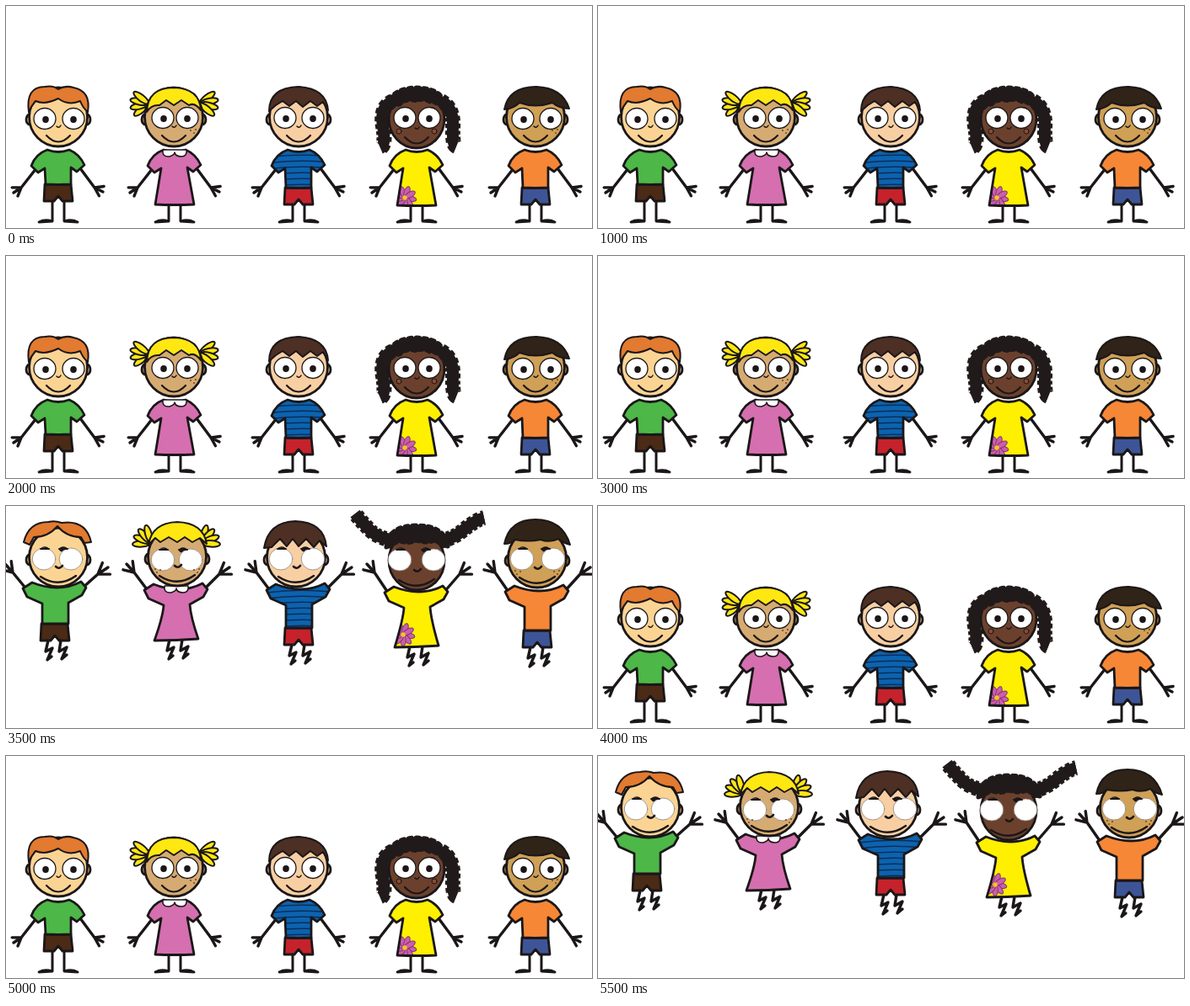
These frames come from a looping animation (695 px wide and 264 px high, 6000 ms). An HTML page:

```html
<!DOCTYPE html>
<html lang="en">
<head>
<meta charset="utf-8">
<title>Jumping children</title>
<style>
html, body { margin: 0; width: 100%; height: 100%; overflow: hidden; background: #fff; }
svg { display: block; width: 695px; height: 264px; }
</style>
</head>
<body>
<svg id="stage" viewBox="0 0 695 264" fill="none" stroke="#1b1718" stroke-width="2.8" stroke-linecap="round" stroke-linejoin="round"></svg>
<script>
const ink = '#1b1718', flat = 'stroke="none"';
const path = (d, fill = 'none', extra = '') => `<path d="${d}" fill="${fill}" ${extra}/>`;
const oval = (x, y, rx, ry, fill, extra = '') => `<ellipse cx="${x}" cy="${y}" rx="${rx}" ry="${ry}" fill="${fill}" ${extra}/>`;
const at = (x, y, s) => `<g transform="translate(${x} ${y})">${s}</g>`;

// x: body centre, head: [x, y], eyes: [left x, right x, y], hem: lower edge of the top
const kids = [
  {
    skin: '#fbd494', hair: '#e27a30', top: '#4db748', shorts: '#4b2a16',
    stand: { x: 62, head: [62, 132], eyes: [46, 80, 134], hem: 212,
      hair: 'M27 126Q23 96 46 96Q56 94 62 99Q70 94 80 97Q101 101 97 126Q91 121 88 113Q74 119 62 110Q46 118 35 113Q30 119 27 126Z' },
    jump: { x: 58, dy: 0, head: [62, 61], eyes: [45, 77, 63], hem: 140,
      hair: 'M21 43Q27 19 50 19Q58 17 66 20Q95 16 101 43L93 44L89 37Q72 37 61 24Q50 37 33 37L28 46Z' }
  },
  {
    skin: '#d6ab72', hair: '#ffe711', top: '#d56fb0', dress: true, tails: true, freckles: true,
    stand: { x: 200, head: [199, 132], eyes: [186, 215, 133], hem: 236, tail: [169, 230, 116, 140],
      hair: 'M167 126Q168 97 199 97Q230 98 231 124Q224 114 217 118L208 112L199 118L190 112L182 118Q172 117 167 126Z' },
    jump: { x: 202, dy: 2, head: [203, 60], eyes: [186, 219, 64], hem: 159, tail: [172, 232, 44, 176],
      hair: 'M169 46Q173 20 203 19Q234 20 238 45L230 38L221 43L212 37L203 43L193 37L183 43L177 38Z' }
  },
  {
    skin: '#f8cfa3', hair: '#4d2f24', top: '#0c63ae', shorts: '#c5222c', stripes: true,
    stand: { x: 347, head: [347, 132], eyes: [331, 364, 133], hem: 216,
      hair: 'M312 125Q312 97 347 96Q380 98 382 124L376 114L369 119L361 113L352 120L344 113L336 119L328 113L320 118Z' },
    jump: { x: 347, dy: 2, head: [344, 61], eyes: [326, 364, 63], hem: 145,
      hair: 'M306 50Q311 19 343 18Q377 19 380 48L372 41L365 49L356 39L347 48L340 39L333 48L325 39L315 49Z' }
  },
  {
    skin: '#6b412d', hair: '#211a1b', top: '#fff000', dress: true, braided: true,
    stand: { x: 487, head: [487, 134], eyes: [473, 502, 133], hem: 237, flower: [-14, 228],
      hair: 'M453 129Q449 98 487 97Q525 98 521 129Q516 114 503 114Q494 109 487 113Q475 109 467 117Q457 117 453 129Z',
      braids: ['M459 113Q443 120 447 143T444 169', 'M516 113Q531 121 530 143T534 167'] },
    jump: { x: 487, dy: 5, head: [487, 65], eyes: [467, 507, 64], hem: 167, flower: [-16, 153],
      hair: 'M451 49Q453 23 487 23Q521 23 524 48Q514 45 509 41Q498 45 487 41Q476 46 466 41Q458 47 451 49Z',
      braids: ['M466 41Q443 40 432 29T414 9', 'M508 42Q526 42 542 29T567 14'] }
  },
  {
    skin: '#cfa056', hair: '#302317', top: '#f68736', shorts: '#3d5597', freckles: true,
    stand: { x: 628, head: [628, 132], eyes: [613, 646, 134], hem: 216,
      hair: 'M591 123Q596 96 629 96Q660 97 668 122Q656 122 648 115Q628 122 609 115Q602 122 591 123Z' },
    jump: { x: 630, dy: 4, head: [630, 62], eyes: [612, 649, 63], hem: 148,
      hair: 'M591 45Q597 16 628 16Q660 16 669 46Q660 44 655 39Q645 44 634 40Q620 43 603 40Q600 45 591 45Z' }
  }
];

function arm(x0, y0, x1, y1, x2, y2) {
  const a = Math.atan2(y2 - y1, x2 - x1), len = Math.hypot(x2 - x1, y2 - y1);
  let d = `M${x0} ${y0}L${x1} ${y1}`;
  for (const turn of [-0.6, 0, 0.6])
    d += `M${x1} ${y1}l${len * Math.cos(a + turn)} ${len * Math.sin(a + turn)}`;
  return path(d, 'none', 'stroke-width="3.4"');
}

function petals(x, y, count, length, width, fill, from, step) {
  let s = '';
  for (let i = 0; i < count; i++)
    s += `<g transform="translate(${x} ${y}) rotate(${from + i * step})">${oval(length / 2, 0, length / 2, width, fill)}</g>`;
  return s;
}

function jumpTop(dy, hem, dress) {
  const Y = y => y + dy;
  const sides = dress
    ? [`Q17 ${Y(130)} 26 ${hem - 1}`, `Q0 ${hem + 1} -26 ${hem + 1}Q-16 ${Y(130)}`]
    : [`L16 ${hem}`, `L-15 ${hem}L`];
  return `M-27 ${Y(91)}Q-12 ${Y(97)} 2 ${Y(97)}Q18 ${Y(97)} 31 ${Y(90)}L37 ${Y(97)}L32 ${Y(106)}L16 ${Y(115)}`
    + `${sides[0]}${sides[1]} -15 ${Y(116)}L-33 ${Y(108)}L-38 ${Y(98)}Z`;
}

function standTop(hem, dress) {
  const w = dress ? 23 : 15;
  return `M-13 171Q0 176 13 171Q25 176 31 189L22 197L15 192L${w} ${hem}Q0 ${hem + 1} ${-w} ${hem}L-16 193L-24 198L-32 190Q-27 176 -13 171Z`;
}

function body(k, p, up, id) {
  const { x, hem, dy = 0 } = p;
  let s = '';
  if (up) {
    const hip = hem + (k.dress ? 0 : 20);
    s += path(`M-8 ${hip}l-3 13l8 -4l-6 14l5 -4M7 ${hip}l-2 13l9 -5l-6 14l6 -5`, 'none', 'stroke-width="3.4"');
    s += arm(-32, 101 + dy, -50, 79, -59, 69) + arm(32, 98 + dy, 51, 81, 63, 73);
  } else {
    s += path('M-7 233V255M7 233V255', 'none', 'stroke-width="3"');
    s += path('M-23 257Q-16 253 -7 256ZM7 256Q16 253 23 257Z', ink);
    s += arm(-26, 193, -44, 216, -53, 222) + arm(26, 193, 43, 216, 53, 221);
  }
  if (!k.dress)
    s += path(`M-16 ${hem}H15L17 ${hem + 20}H5L0 ${hem + 14}L-5 ${hem + 20}H-17Z`, k.shorts);

  const shape = up ? jumpTop(dy, hem, k.dress) : standTop(hem, k.dress);
  let print = '';
  if (k.stripes) {
    let lines = '';
    for (let y = up ? 101 : 178; y < hem; y += 7) lines += `M-38 ${y + 2}Q0 ${y - 3} 38 ${y + 1}`;
    print = path(lines, 'none', 'stroke="#0c2d5a" stroke-width="1.6"');
  }
  if (p.flower) {
    const [fx, fy] = p.flower;
    print = `<g stroke="#7a3a70" stroke-width="1">${petals(fx, fy, 9, 14, 3.2, '#cf5cae', 10, 40)}</g>`
      + oval(fx, fy, 2.8, 2.8, '#f6c51e', flat);
  }
  s += path(shape, k.top, flat);
  if (print)
    s += `<clipPath id="${id}"><path d="${shape}"/></clipPath><g clip-path="url(#${id})">${print}</g>`;
  s += path(shape);
  if (k.tails) {
    const y = up ? 98 : 174;
    s += path(`M-14 ${y - 3}Q-15 ${y + 6} -6 ${y + 5}Q0 ${y + 3} 0 ${y}Q1 ${y + 5} 8 ${y + 5}Q15 ${y + 5} 14 ${y - 3}Z`, '#fff', 'stroke-width="1.5"');
  }
  return at(x, 0, s);
}

function head(k, p, up) {
  const [x, y] = p.head, [l, r, ey] = p.eyes;
  let s = '';
  if (k.tails) {
    const [tl, tr, ty, turn] = p.tail;
    s += `<g stroke-width="2">${petals(tl, ty, 4, 22, 3.8, k.hair, turn, 26) + petals(tr, ty, 4, 22, 3.8, k.hair, 102 - turn, 26)}</g>`;
  }
  for (const d of p.braids || []) {
    s += path(d, 'none', `stroke="${k.hair}" stroke-width="14" stroke-linecap="butt"`);
    s += path(d, 'none', `stroke="${k.hair}" stroke-width="18" stroke-dasharray="5 3" stroke-linecap="butt"`);
  }
  if (!k.braided)
    s += oval(x - 34, y + 3, 4, 6, k.skin) + oval(x + 34, y + 3, 4, 6, k.skin);
  s += oval(x, y, k.braided ? 33 : 34.5, 35, k.skin);
  s += path(p.hair, k.hair, 'stroke-width="2"');
  if (k.braided)
    s += path(p.hair, 'none', `stroke="${k.hair}" stroke-width="5" stroke-dasharray="4 5"`);

  if (up) {
    for (const [e, px] of [[l, l + 1], [r, r - 9]]) {
      s += oval(px, ey - 11.5, 5, 3.2, ink, flat);
      s += oval(e, ey, 13.8, 13, '#fff', 'stroke="#8a827c" stroke-width=".8"');
      s += path(`M${px - 5} ${ey - 12}h10`, 'none', 'stroke-width="2"');
    }
    s += path(`M${x - 3} ${y + 11}q4 4 8 -1`, 'none', 'stroke-width="2.6"');
    s += path(`M${x - 21} ${y + 23}Q${x} ${y + 37} ${x + 21} ${y + 22}`, 'none', 'stroke-width="2.4"');
  } else {
    for (const [e, px] of [[l, l + 1], [r, r]])
      s += oval(e, ey, 13, 12.5, '#fff', 'stroke-width="1.3"') + oval(px, ey + 1, 3.8, 4, ink, flat);
    s += path(`M${x - 2} ${y + 11}q3 3 5 -1`, 'none', 'stroke-width="1.5"');
    s += path(`M${x - 14} ${y + 22}Q${x} ${y + 37} ${x + 14} ${y + 22}`, 'none', 'stroke-width="2.2"');
  }
  if (k.freckles)
    for (const [fx, fy] of [[20, 16], [24, 19], [26, 15]])
      s += oval(x + fx, y + fy, 1, 1, '#75421f', flat) + (up ? oval(x - fx, y + fy, 1, 1, '#75421f', flat) : '');
  if (k.braided && !up)
    for (const side of [-21, 21])
      s += oval(x + side, y + 15, 3, 3, '#8b4a32', 'stroke-width="1"');
  return s;
}

const stage = document.getElementById('stage');
stage.innerHTML = ['stand', 'jump'].map((pose, up) =>
  `<g>${kids.map((k, i) => body(k, k[pose], up, pose + i) + head(k, k[pose], up)).join('')}</g>`).join('');
const poses = [...stage.children];

const start = performance.now();
function draw(now) {
  const current = Math.floor(Math.max(0, now - start) / 500) % 2;
  poses.forEach((g, i) => g.style.display = i === current ? '' : 'none');
  requestAnimationFrame(draw);
}
draw(start);
</script>
</body>
</html>
```
